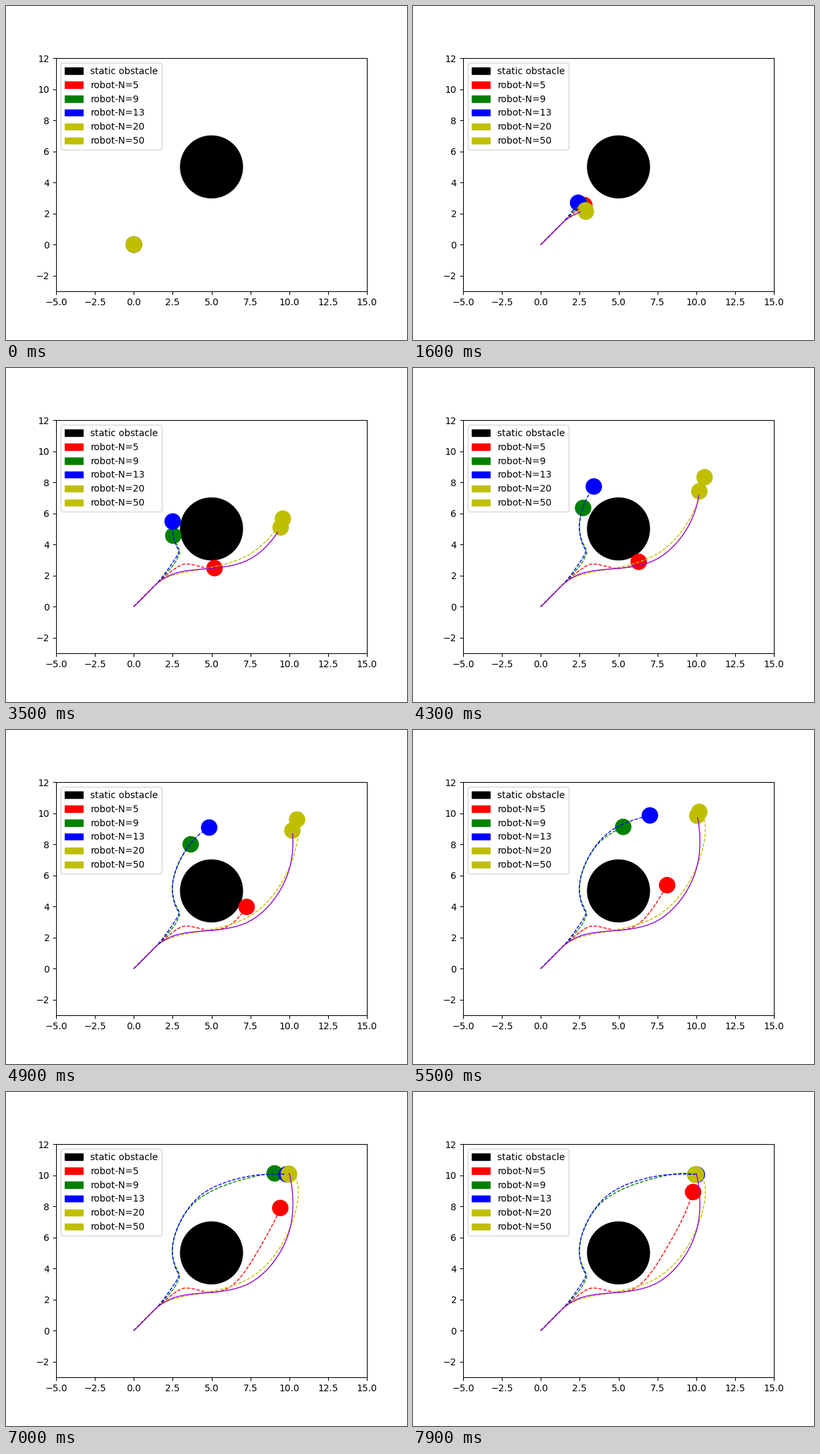
These frames come from a looping animation (600 px wide and 500 px high, 8000 ms). A matplotlib script:

```python
import numpy as np
import matplotlib.pyplot as plt
from matplotlib.animation import FuncAnimation
from matplotlib.patches import Circle, Patch

FRAMES = 80
STEP_MS = 100

# Shared launch along the diagonal: (step, x, y)
LAUNCH = [(0, 0, 0), (9, 1, 1), (11, 1.45, 1.45)]


def glide(keys):
    """Cubic spline through (step, x, y) keys: starts at rest, ends unbent."""
    k = np.array(LAUNCH + keys, float)
    t, p = k[:, 0], k[:, 1:]
    h = np.diff(t)[:, None]
    chord = np.diff(p, axis=0) / h

    # Slopes that keep the acceleration continuous
    a = np.eye(len(t))
    b = np.zeros_like(p)
    for i in range(1, len(t) - 1):
        h0, h1 = h[i - 1, 0], h[i, 0]
        a[i, i - 1:i + 2] = h1, 2 * (h0 + h1), h0
        b[i] = 3 * (h1 * chord[i - 1] + h0 * chord[i])
    a[-1, -2:] = 1, 2
    b[-1] = 3 * chord[-1]
    m = np.linalg.solve(a, b)

    now = np.arange(FRAMES)
    i = np.clip(np.searchsorted(t, now, side="right") - 1, 0, len(h) - 1)
    u = (now - t[i])[:, None] / h[i]
    ease = u * u * (3 - 2 * u)
    bend = u * (1 - u) * ((1 - u) * m[i] - u * m[i + 1])
    return p[i] + ease * (p[i + 1] - p[i]) + h[i] * bend


fig, ax = plt.subplots(figsize=(6, 5), dpi=100)
ax.set_aspect("equal")
ax.set_xlim(-5, 15)
ax.set_ylim(-3, 12)
ax.add_patch(Circle((5, 5), 2, color="k"))

handles = [Patch(color="k", label="static obstacle")]
robots = []


def add_robot(horizon, color, keys, trail_color=None, style="--"):
    body = ax.add_patch(Circle((0, 0), 0.5, color=color))
    trail, = ax.plot([], [], style, color=trail_color or color, lw=1)
    robots.append((body, trail, glide(keys)))
    handles.append(Patch(color=color, label=f"robot-N={horizon}"))


# Short horizon: creeps around below the obstacle
add_robot(5, "r", [
    (16, 2.8, 2.54), (20, 3.42, 2.74), (27, 4.45, 2.53), (36, 5.3, 2.49),
    (43, 6.3, 2.88), (55, 8.13, 5.37), (63, 8.97, 6.9), (79, 9.8, 8.92)])

# Medium horizons: hesitate, then pass above
add_robot(9, "g", [
    (16, 2.5, 2.62), (22, 2.86, 3.25), (27, 2.95, 3.54), (36, 2.5, 4.75),
    (43, 2.72, 6.35), (49, 3.66, 8.0), (55, 5.3, 9.12), (63, 7.73, 9.91),
    (79, 9.95, 10.04)])
add_robot(13, "b", [
    (16, 2.4, 2.69), (22, 2.89, 3.53), (27, 2.74, 3.9), (36, 2.54, 5.75),
    (43, 3.41, 7.73), (49, 4.85, 9.08), (55, 7.02, 9.86), (63, 9.08, 10.07),
    (79, 10.04, 10.04)])

# Long horizons: sweep past below at full speed
add_robot(20, "y", [
    (16, 2.9, 2.12), (27, 7.33, 3.3), (36, 9.78, 6.01), (45, 10.59, 8.85),
    (55, 10.2, 10.09), (63, 10.02, 10.1), (79, 9.97, 10.04)])
add_robot(50, "y", [
    (16, 2.87, 2.2), (27, 7.25, 2.95), (35, 9.45, 5.1), (43, 10.2, 7.42),
    (55, 10.07, 9.84), (63, 10.0, 10.11), (79, 9.98, 10.05)],
    "darkviolet", "-")

ax.legend(handles=handles, loc="upper left")


def update(step):
    # Trails end one step behind their robots.
    for body, trail, path in robots:
        body.center = path[step]
        trail.set_data(path[:step, 0], path[:step, 1])
    return [artist for body, trail, _ in robots for artist in (body, trail)]


anim = FuncAnimation(fig, update, frames=FRAMES, init_func=lambda: update(0),
                     interval=STEP_MS, repeat=True, repeat_delay=0)
plt.show()
```
